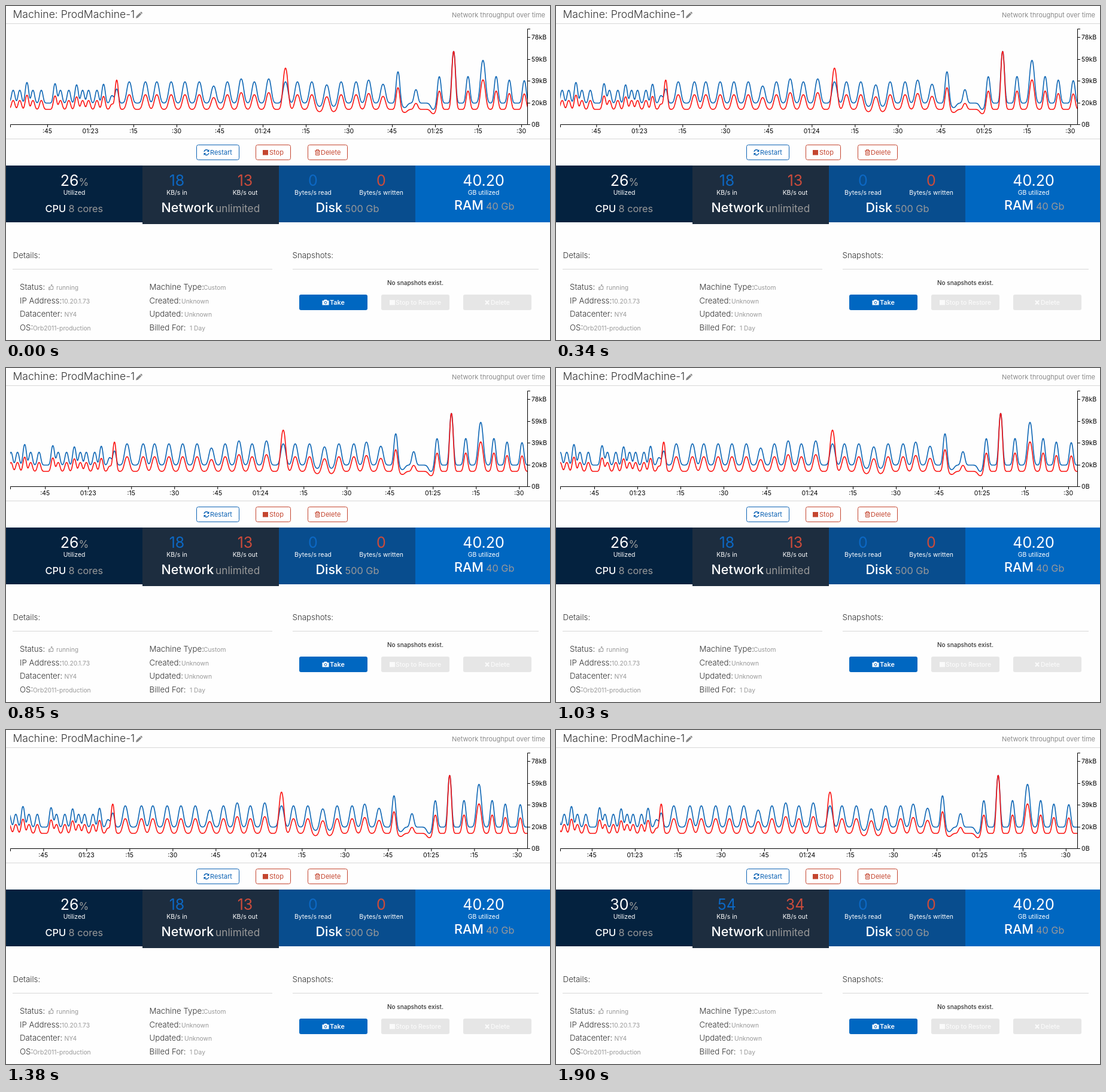
Animation, 909 px wide and 559 px high, one loop 2010 ms. Source, as an HTML page:

```html
<!DOCTYPE html>
<html lang="en">
<head>
<meta charset="utf-8">
<title>Machine dashboard</title>
<style>
html, body { margin: 0; width: 100%; height: 100%; overflow: hidden; background: #fefefe; }
svg { display: block; width: 100%; height: 100%; font-family: Inter, Roboto, sans-serif; }
text { white-space: pre; }
.rule { stroke: #d8d8d8; }
.axis { stroke: #000; fill: none; }
.curve { fill: none; stroke-width: 1.6; stroke-linejoin: round; }
.thin { fill: none; stroke: #c4452f; }
</style>
</head>
<body>
<svg id="stage" viewBox="0 0 909 559">
  <clipPath id="plot"><rect x="7" y="30" width="865" height="168"/></clipPath>
  <path class="rule" d="M0 29.5H909M0 222.5H909M11 440.5H445M479 440.5H890"/>

  <g clip-path="url(#plot)">
    <g class="scroll">
      <path id="blue" class="curve" stroke="#0c65b4"/>
      <path id="red" class="curve" stroke="#fb1210"/>
    </g>
  </g>
  <path class="axis" d="M7.5 203V198.5H871.5M876 38.5H871.5V198.5H876"/>
  <g id="ticks" class="scroll"></g>

  <!-- Action buttons -->
  <g fill="#fff" stroke="#c4452f">
    <rect x="318.5" y="232.5" width="71" height="25" rx="3" stroke="#0c62b4"/>
    <rect x="417.5" y="232.5" width="58" height="25" rx="3"/>
    <rect x="504.5" y="232.5" width="66" height="25" rx="3"/>
  </g>
  <path class="thin" style="stroke:#0c62b4;stroke-width:1.4" d="M331 244a4 4 0 0 1 7-2M339 246a4 4 0 0 1-7 2"/>
  <path fill="#0c62b4" d="M339.5 240v4h-4zM330.5 250v-4h4z"/>
  <rect x="429" y="241" width="9" height="8.5" fill="#c4452f"/>
  <path class="thin" d="M516 242.5h9M518.5 242v-1.5h4v1.5M517.5 243v6.5h6v-6.5M519.5 244v4m2-4v4"/>

  <!-- Usage tiles -->
  <rect y="267" width="228" height="95" fill="#04223f"/>
  <rect x="228" y="267" width="228" height="98" fill="#1d2d3f"/>
  <rect x="456" y="267" width="228" height="95" fill="#084d8e"/>
  <rect x="684" y="267" width="225" height="95" fill="#0067c1"/>

  <!-- Snapshot buttons -->
  <rect x="490" y="483" width="114" height="26" rx="3" fill="#0067c1"/>
  <rect x="627" y="483" width="114" height="26" rx="3" fill="#e6e6e6"/>
  <rect x="764" y="483" width="114" height="26" rx="3" fill="#e6e6e6"/>
  <path fill="#fff" d="M528.5 493h2.5l1-1.5h4l1 1.5h2.5v7.5h-11z"/>
  <circle cx="534" cy="496.5" r="2" fill="#fff" stroke="#0067c1"/>
  <rect x="641" y="492" width="9" height="8.5" fill="#fafafa"/>
  <path d="M801 493l6 6.5m0-6.5l-6 6.5" stroke="#fafafa" stroke-width="2.2"/>

  <!-- Pencil and thumb -->
  <path fill="#888" d="M217 20.5l.7-3.3 6-6 2.6 2.6-6 6zM224.3 10.7l1-1h1l1.5 1.5v1l-1 1z"/>
  <path fill="none" stroke="#999" d="M71.5 470.5h2v4.500h-2zM73.500 470.500l2-2v-2h1.500v3h2l-.5 5h-4"/>
</svg>
<script>
const $ = id => document.getElementById(id);
const stage = $('stage');
const INK = '#333', GREY = '#999', BLUE = '#0c68c4', RED = '#cb4b3b', WHITE = '#fff', PALE = '#fafafa';

function label(x, y, size, fill, str, anchor = 'start', weight = 400, parent = stage) {
  const el = document.createElementNS('http://www.w3.org/2000/svg', 'text');
  const attrs = { x, y, fill, 'font-size': size, 'text-anchor': anchor, 'font-weight': weight };
  for (const name in attrs) el.setAttribute(name, attrs[name]);
  el.textContent = str;
  parent.append(el);
  return el;
}

function tick(d) {
  $('ticks').insertAdjacentHTML('beforeend', `<path class="axis" d="${d}"/>`);
}

// Header and axis labels
label(11.5, 20, 17.6, INK, 'Machine: ProdMachine-1', 'start', 300);
label(901, 19, 11, '#8a8a8a', 'Network throughput over time', 'end');
['78kB', '59kB', '39kB', '20kB', '0B'].forEach((s, i) => {
  label(878, 56 + i * 36.5, 10.6, '#000', s);
  stage.insertAdjacentHTML('beforeend', `<path class="axis" d="M872 ${52.5 + Math.round(i * 36.5)}h4"/>`);
});
for (let i = 0; i < 12; i++) {
  const x = 69 + i * 72, seconds = (45 + i * 15) % 60;
  const text = seconds ? ':' + seconds : '01:' + (23 + (i - 1) / 4);
  label(x, 213, 10.5, '#000', text, 'middle', 400, $('ticks'));
  tick(`M${x + .5} 198v5`);
}

// Buttons
label(341, 249, 11, '#0c62b4', 'Restart');
label(440, 249, 11, '#c4452f', 'Stop');
label(526, 249, 11, '#c4452f', 'Delete');
label(541, 500, 10.8, WHITE, 'Take', 'start', 600);
label(651, 500, 10.4, PALE, 'Stop to Restore', 'start', 500);
label(810, 500, 10.4, PALE, 'Delete', 'start', 500);

// Tiles
function metric(x, fill, value, unit) {
  label(x, 316, 10.4, WHITE, unit, 'middle');
  return label(x, 301, 25, fill, value, 'middle');
}
label(114, 316, 10.4, WHITE, 'Utilized', 'middle');
label(121.5, 301, 17, GREY, '%');
const cpu = label(121.5, 301, 25, WHITE, '', 'end');
const netIn = metric(285.5, BLUE, '', 'KB/s in');
const netOut = metric(399.5, RED, '', 'KB/s out');
metric(513, BLUE, '0', 'Bytes/s read');
metric(627, RED, '0', 'Bytes/s written');
metric(798, WHITE, '40.20', 'GB utilized');

function caption(x, noteX, y, size, name, note, noteSize = 16.3) {
  label(x, y, size, WHITE, name, 'start', 500);
  label(noteX, y, noteSize, GREY, note);
}
caption(65.5, 104.5, 345, 16.4, 'CPU', '8 cores');
caption(259.5, 350, 345, 21.5, 'Network', 'unlimited', 17.3);
caption(517.5, 566.5, 345, 21.5, 'Disk', '500 Gb');
caption(749, 802, 341, 21.5, 'RAM', '40 Gb');

// Details
label(11.5, 422, 13.4, INK, 'Details:', 'start', 300);
label(478.5, 422, 13.3, INK, 'Snapshots:', 'start', 300);
label(684, 467, 10, INK, 'No snapshots exist.', 'middle', 500);

function detail(x, valueX, row, name, value) {
  const y = 475 + row * 22.7;
  label(x, y, 13.3, INK, name, 'start', 300);
  label(valueX, y, 10.3, GREY, value);
}
detail(23, 84, 0, 'Status:', 'running');
detail(23, 93, 1, 'IP Address:', '10.20.1.73');
detail(23, 97.5, 2, 'Datacenter:', 'NY4');
detail(23, 45, 3, 'OS:', 'Orb2011-production');
detail(239.5, 330, 0, 'Machine Type:', 'Custom');
detail(239.5, 293, 1, 'Created:', 'Unknown');
detail(239.5, 298, 2, 'Updated:', 'Unknown');
detail(239.5, 307, 3, 'Billed For:', '1 Day');

// Traffic: bumps on a flat base; red follows blue except at a few peaks
const BLUE_BASE = 162.5, RED_BASE = 173, RATIO = .69;
const redPeaks = { 185: 124, 467: 104, 685: 163, 748: 76 };
const bumps = [];

function add(width, usual, xs, others) {
  for (const x of xs) others[x] = usual;
  for (const x in others) {
    const blue = BLUE_BASE - others[x];
    const red = x in redPeaks ? RED_BASE - redPeaks[x] : blue * RATIO;
    bumps.push({ x: +x, width, blue, red });
  }
}
add(2.8, 141, [1, 12, 23, 45, 59, 91, 105, 128, 138, 152],
  { 35: 128, 82: 130, 118: 132, 163: 131, 177: 150, 185: 139 });
add(4.1, 127, [206, 233, 252, 276, 299, 323, 370, 415, 467, 487, 511, 560, 585],
  { 347: 134, 393: 122, 439: 122, 524: 168, 536: 132, 547: 168, 606: 124, 630: 131,
    666: 170, 714: 173, 797: 91 });
add(3.1, 118, [724, 772, 819],
  { 655: 110, 685: 140, 748: 76, 841: 124, 866: 125 });

function curve(series, base) {
  let d = '';
  for (let x = 5; x < 890; x += .5) {
    let y = base;
    for (const b of bumps)
      y -= b[series] * Math.exp(-.5 * Math.abs((x - b.x) / b.width) ** 2.3);
    d += (d ? 'L' : 'M') + x + ' ' + y.toFixed(2);
  }
  $(series).setAttribute('d', d);
}
curve('blue', BLUE_BASE);
curve('red', RED_BASE);

const LOOP = 2010, STEP = 86.5, SPEED = .416;
const scrollers = document.querySelectorAll('.scroll');
const start = performance.now();

function draw() {
  const t = (performance.now() - start) % LOOP;
  const step = Math.min(22, Math.floor((t + 12) / STEP));
  scrollers.forEach(g => g.setAttribute('transform', `translate(${-step * SPEED} 0)`));
  const updated = step >= 18;
  cpu.textContent = updated ? '30' : '26';
  netIn.textContent = updated ? '54' : '18';
  netOut.textContent = updated ? '34' : '13';
  requestAnimationFrame(draw);
}
draw();
</script>
</body>
</html>
```
